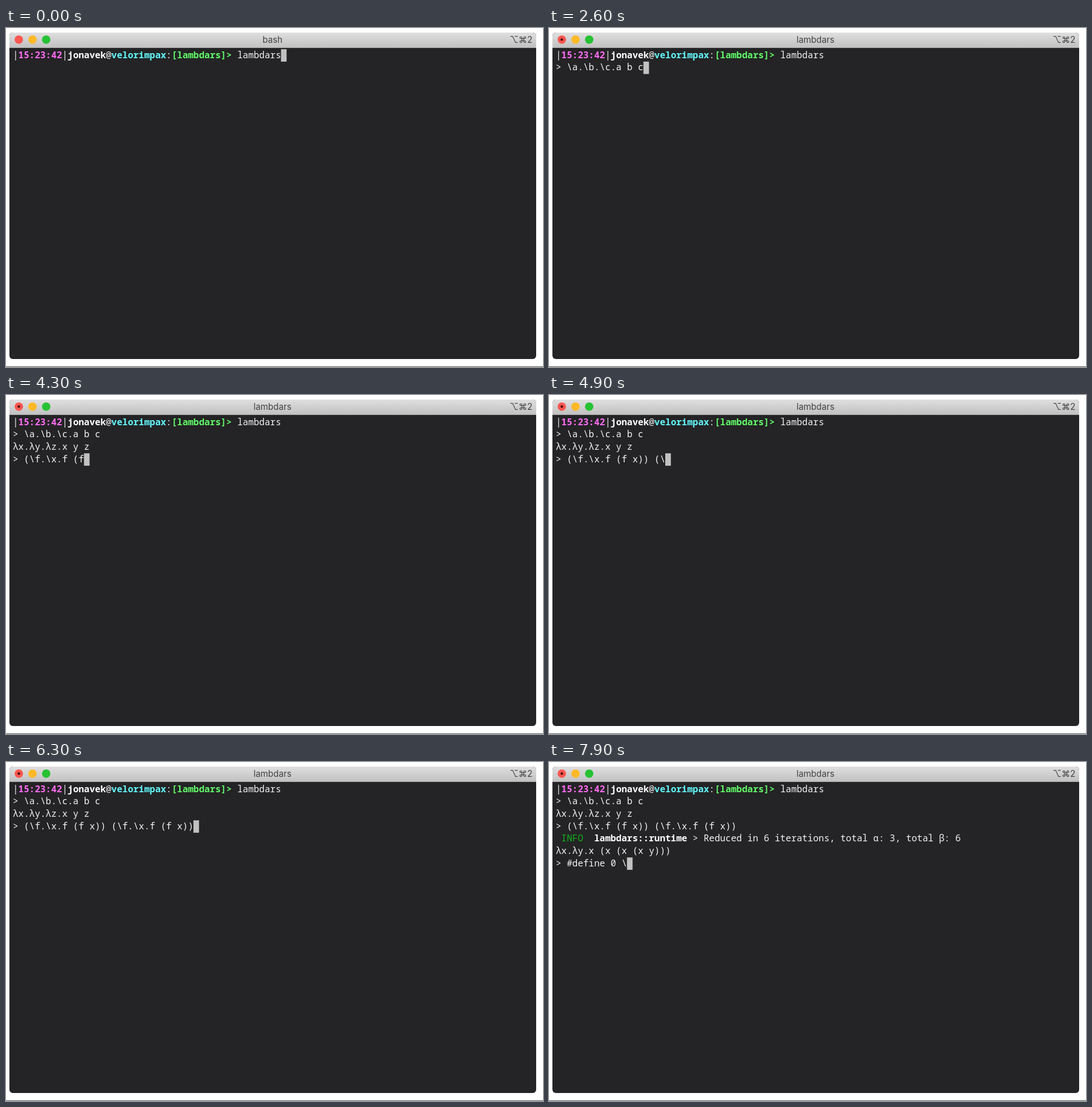
An HTML page for the animation above (8 s loop, 942 by 594 pixels).

```html
<!DOCTYPE html>
<html lang="en">
<head>
<meta charset="utf-8">
<title>Terminal session</title>
<style>
  html, body { margin: 0; width: 100%; height: 100%; overflow: hidden; background: #fff; }
  svg { display: block; width: 942px; height: 594px; }
  .bar { font: 400 15.2px Inter, "DejaVu Sans", sans-serif; fill: #424242; }
  .row { font: 300 16px "Noto Sans Mono", monospace; fill: #f4f4f4; white-space: pre; }
  .row .b { font-weight: 700; }
  .time { fill: #ff6cf4; }
  .user { fill: #fff; }
  .host { fill: #62f8fb; }
  .path { fill: #61fb69; }
  .info { fill: #0fb41a; }
</style>
</head>
<body>
<svg viewBox="0 0 942 594">
  <defs>
    <linearGradient id="metal" x2="0" y2="1">
      <stop offset="0" stop-color="#e0dfe0"/>
      <stop offset="1" stop-color="#c1c0c1"/>
    </linearGradient>
  </defs>
  <rect x="6" y="8" width="924" height="572" rx="6" fill="#242325"/>
  <path d="M6 35V14a6 6 0 0 1 6-6H924a6 6 0 0 1 6 6V35Z" fill="url(#metal)"/>
  <rect x="6" y="34" width="924" height="1" fill="#aaa9aa"/>
  <rect y="593" width="942" height="1" fill="#4d554d"/>
  <circle cx="22.5" cy="20.3" r="7.4" fill="#fc5750"/>
  <circle cx="46.5" cy="20.3" r="7.4" fill="#fdb927"/>
  <circle cx="70.5" cy="20.3" r="7.4" fill="#27c234"/>
  <circle id="busy" cx="22.5" cy="20.3" r="2.3" fill="#4c0a08"/>
  <text class="bar" id="title" x="467.5" y="26.3" text-anchor="middle"></text>
  <text class="bar" x="923.5" y="26.3" text-anchor="end">⌥⌘2</text>
  <g id="rows"></g>
  <rect id="cursor" width="9.8" height="21.7" fill="#c2c1c2"/>
</svg>
<script>
const LOOP = 8000, LEFT = 12, TOP = 37.2, CELL = 9.6, PITCH = 21.67;
const $ = id => document.getElementById(id);

// Each part is [text, class].
const prompt = [
  ['|', ''], ['15:23:42', 'b time'], ['|', ''], ['jonavek', 'b user'], ['@', ''],
  ['velorimpax', 'b host'], [':', ''], ['[lambdars]>', 'b path'], [' lambdars', '']
];
const log = [
  [' INFO', 'info'], ['  ', ''], ['lambdars::runtime', 'b user'],
  [' > Reduced in 6 iterations, total α: 3, total β: 6', '']
];
const plain = text => [[text, '']];

// keys: [ms, characters typed], linear in between.
const lines = [
  { at: 0, parts: prompt },
  { at: 700, typed: '\\a.\\b.\\c.a b c', keys: [[900, 0], [2300, 14]] },
  { at: 2900, parts: plain('λx.λy.λz.x y z') },
  { at: 2900, typed: '(\\f.\\x.f (f x)) (\\f.\\x.f (f x))',
    keys: [[3300, 0], [3500, 2], [4300, 11], [5500, 25], [6300, 31]] },
  { at: 6600, parts: log },
  { at: 6600, parts: plain('λx.λy.x (x (x (x y)))') },
  { at: 6600, typed: '#define 0 \\', keys: [[6900, 0], [7400, 5], [7900, 11]] }
];

function typedCount(keys, t) {
  let [t0, n0] = keys[0];
  for (const [t1, n1] of keys) {
    if (t < t1) return t <= t0 ? n0 : Math.floor(n0 + (n1 - n0) * (t - t0) / (t1 - t0) + 1e-6);
    [t0, n0] = [t1, n1];
  }
  return n0;
}

function svgNode(name, cls, parent) {
  const node = document.createElementNS('http://www.w3.org/2000/svg', name);
  if (cls) node.setAttribute('class', cls);
  return parent.appendChild(node);
}

lines.forEach((line, i) => {
  const el = line.el = svgNode('text', 'row', $('rows'));
  el.setAttribute('x', LEFT);
  el.setAttribute('y', TOP + 15.5 + i * PITCH);
  for (const [text, cls] of line.parts || []) svgNode('tspan', cls, el).textContent = text;
});

function draw(now) {
  const t = Math.floor((now % LOOP) / 100) * 100;
  let row = 0, col = 49;
  lines.forEach((line, i) => {
    const shown = t >= line.at;
    line.el.style.display = shown ? '' : 'none';
    if (shown && line.typed) {
      const text = '> ' + line.typed.slice(0, typedCount(line.keys, t));
      if (line.el.textContent !== text) line.el.textContent = text;
      row = i;
      col = text.length;
    }
  });
  if (t === 600) { row = 1; col = 0; }
  $('cursor').setAttribute('x', LEFT + col * CELL);
  $('cursor').setAttribute('y', TOP + row * PITCH);

  const running = t >= 1000;
  $('title').textContent = running ? 'lambdars' : 'bash';
  $('busy').style.display = running ? '' : 'none';
}

const start = performance.now();
(function tick() {
  draw(performance.now() - start);
  requestAnimationFrame(tick);
})();
</script>
</body>
</html>
```
